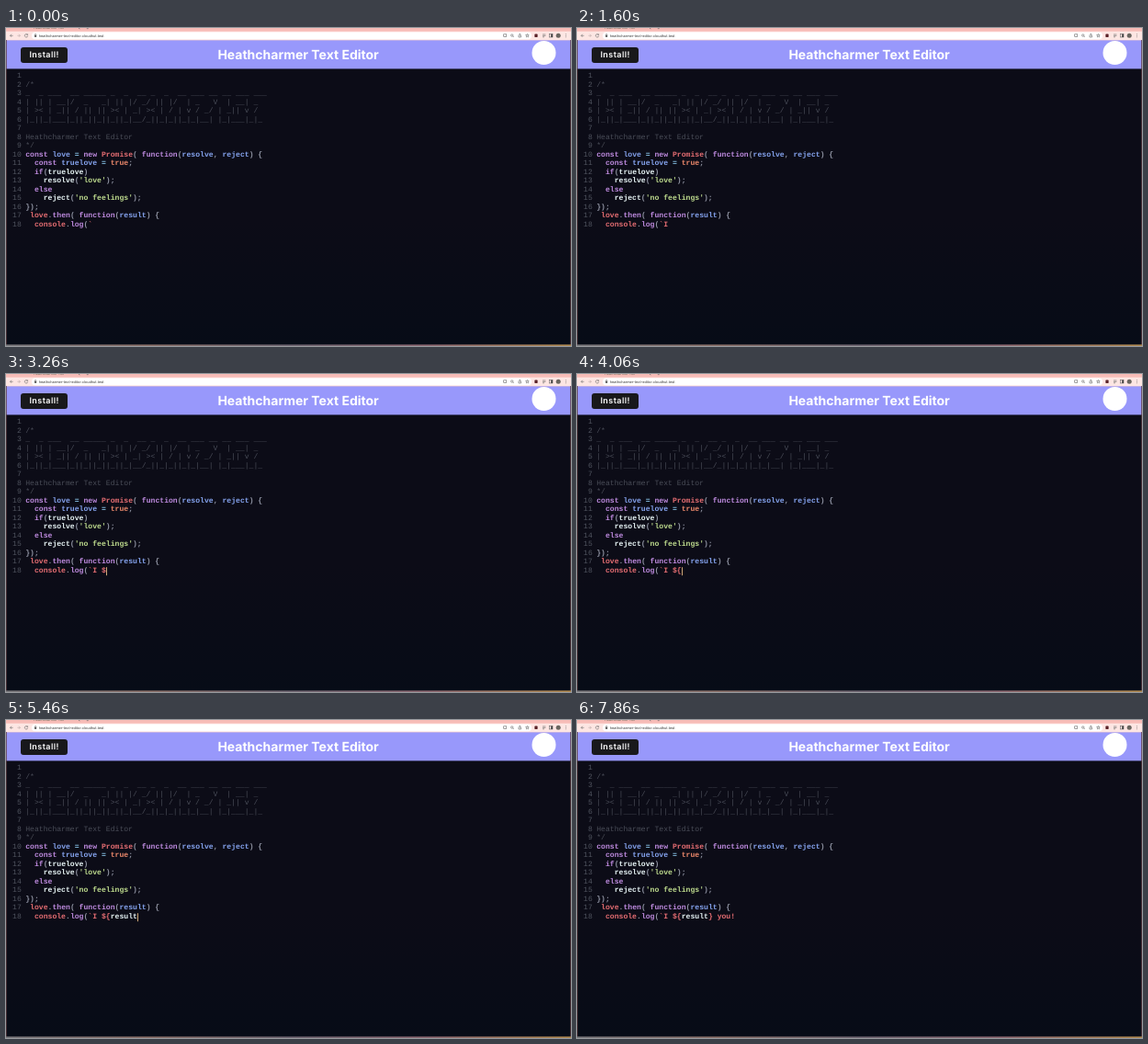
Recreate the animation shown at these times as an HTML page. Size 615 by 346 pixels, loop 8 s.

```html
<!DOCTYPE html>
<html lang="en">
<head>
<meta charset="utf-8">
<title>Text Editor</title>
<style>
html, body { margin: 0; width: 100%; height: 100%; overflow: hidden; background: #0b0c17; }
body {
  position: relative; text-rendering: geometricPrecision; font-family: Inter, sans-serif;
  background: linear-gradient(#0c0c17 60%, #070c17);
}
svg { position: absolute; left: 0; top: 0; }
h1 {
  position: absolute; left: 10.6px; top: 19.5px; width: 615px; margin: 0;
  font-size: 14px; line-height: 20px; font-weight: 700; text-align: center; color: #fff;
}
.install {
  position: absolute; left: 15.9px; top: 21px; width: 51.6px; height: 17px; border-radius: 3px;
  background: #18181b; color: #fff; font-size: 9px; line-height: 17px; font-weight: 600;
  letter-spacing: .45px; text-align: center;
}
pre {
  position: absolute; left: 0; top: 0; margin: 0; transform: translateY(48.2px);
  font: 700 8.12px/9.5px "Liberation Mono", monospace; color: #8f93a2;
}
#nums { width: 16.8px; text-align: right; font-weight: 400; color: #50545f; }
#code { left: 21.2px; }
.c { color: #4a4d58; font-weight: 400; }
.k { color: #bd8ade; }
.v { color: #e46d72; }
.d { color: #85a3ee; }
.w { color: #e6f3f4; }
.s { color: #bedb8e; }
.a { color: #ea876a; }
.o { color: #8cc8ee; }
#caret {
  display: inline-block; width: .7px; height: 9.5px; margin-right: -.7px;
  vertical-align: top; background: #cfa878;
}
</style>
</head>
<body>
<svg width="615" height="346" viewBox="0 0 615 346">
  <defs>
    <linearGradient id="desk">
      <stop stop-color="#77767a"/><stop offset=".25" stop-color="#8a6f68"/>
      <stop offset=".5" stop-color="#6d6470"/><stop offset=".75" stop-color="#8b6670"/>
      <stop offset="1" stop-color="#b08a50"/>
    </linearGradient>
  </defs>
  <rect width="615" height="14" fill="#f7bcb7"/>
  <rect y="3.7" width="615" height="9.8" fill="#fde6e3"/>
  <rect x="28" y="4.6" width="544" height="7.6" rx="3.8" fill="#fff"/>
  <text x="30" y=".9" font-size="3.8" fill="#665">Heathcharmer Tex</text>
  <g fill="none" stroke="#666" stroke-width=".6">
    <path d="M7.6 8.3H4.6m1.4-1.5L4.5 8.3 6 9.8M79 -.6l1.5 1.5m0-1.5L79 .9M87.6 0h2.4m-1.2-1.2v2.4"/>
    <path d="M12.4 8.3h3m-1.4-1.5 1.5 1.5-1.5 1.5" stroke="#b9a5a3"/>
    <path d="M23.4 7.3A1.7 1.7 0 1 0 23.7 8.6M23.6 6.3v1.2h-1.2"/>
    <path d="M31.4 8V7.2a.7.7 0 0 1 1.4 0V8"/>
    <rect x="541.7" y="6.8" width="3" height="2.7"/>
    <circle cx="550.8" cy="8" r="1.2"/><path d="M551.7 8.9l1.1 1.1"/>
    <path d="M558 7.5v2.5h2.6V7.5M559.3 9V6.2m-.9.9.9-.9.9.9"/>
    <path d="M567.4 6.4l.5 1.2 1.3.1-1 .9.3 1.3-1.1-.7-1.1.7.3-1.3-1-.9 1.3-.1z"/>
    <path d="M584 7h3.4M584 8.4h3.4M584 9.8h2"/>
    <rect x="591.6" y="6.6" width="3.4" height="3.4"/>
  </g>
  <rect x="31" y="7.9" width="2.2" height="1.9" fill="#555"/>
  <rect x="575.4" y="6.6" width="3.2" height="3.4" rx=".6" fill="#5a2228"/>
  <rect x="593.2" y="6.6" width="1.8" height="3.4" fill="#444"/>
  <circle cx="601.2" cy="8.3" r="2.5" fill="#6b6660"/>
  <g fill="#555"><circle cx="609.3" cy="6.7" r=".45"/><circle cx="609.3" cy="8.3" r=".45"/><circle cx="609.3" cy="9.9" r=".45"/></g>
  <text x="35.8" y="9.7" font-size="3.85" fill="#333">heathcharmer-text-editor.cloudhut.test</text>

  <rect y="13.4" width="615" height="31" fill="#9898fb"/>
  <circle cx="585.5" cy="27" r="13" fill="#fff"/>

  <path d="M.4 13V345M614.6 13V345" stroke="#5c3a40" stroke-width=".8"/>
  <rect y="344.4" width="615" height="1.6" fill="url(#desk)"/>
</svg>

<div class="install">Install!</div>
<h1>Heathcharmer Text Editor</h1>

<pre id="nums"></pre>
<pre id="code"><span> </span>
<span class="c">/*
_  _ ___  __ _____ _  _  __ _  _  __ ___ __ __ ___ ___
| || | __|/  _   _| || |/ _/ || |/  | _   V  | __| _
| &gt;&lt; | _|| / || || &gt;&lt; | _| &gt;&lt; | / | v / _/ | _|| v /
|_||_|___|_||_||_||_||_|__/_||_|_||_|_|__| |_|___|_|_

Heathcharmer Text Editor
*/</span>
<span class="k">const</span> <span class="d">love</span> <span class="o">=</span> <span class="k">new</span> <span class="v">Promise</span>( <span class="k">function</span>(<span class="d">resolve</span>, <span class="d">reject</span>) {
  <span class="k">const</span> <span class="d">truelove</span> <span class="o">=</span> <span class="a">true</span>;
  <span class="k">if</span>(<span class="w">truelove</span>)
    <span class="w">resolve</span>(<span class="s">'love'</span>);
  <span class="k">else</span>
    <span class="w">reject</span>(<span class="s">'no feelings'</span>);
});
 <span class="v">love</span>.<span class="k">then</span>( <span class="k">function</span>(<span class="d">result</span>) {
  <span class="v">console</span>.<span class="k">log</span>(<span class="v" id="head"></span><span class="w" id="word"></span><span class="v" id="tail"></span><i id="caret"></i></pre>

<script>
const LOOP = 8000, BLINK = 530;
const text = "`I ${result} you!";
const parts = [["head", 0, 5], ["word", 5, 11], ["tail", 11, 17]];
// [time, characters typed, delay before the caret shows]
const keys = [
  [0, 1, 60], [1600, 2, 60], [1930, 3], [2200, 4], [4060, 5],
  [4730, 6], [4930, 7], [5000, 8], [5130, 9], [5200, 10], [5260, 11],
  [5870, 12], [6460, 13], [6800, 14], [6870, 15], [7000, 16], [7260, 17]
];
const el = id => document.getElementById(id);

el("nums").textContent = Array.from({ length: 18 }, (_, i) => i + 1).join("\n");

function draw() {
  const t = performance.now() % LOOP;
  const [at, count, delay = 0] = keys.filter(k => k[0] <= t).pop();
  for (const [id, from, to] of parts) {
    const s = text.slice(from, Math.max(from, Math.min(to, count)));
    if (el(id).textContent !== s) el(id).textContent = s;
  }
  const on = Math.floor((t - at - delay) / BLINK) % 2 === 0;
  el("caret").style.visibility = on ? "visible" : "hidden";
  requestAnimationFrame(draw);
}
draw();
</script>
</body>
</html>
```
